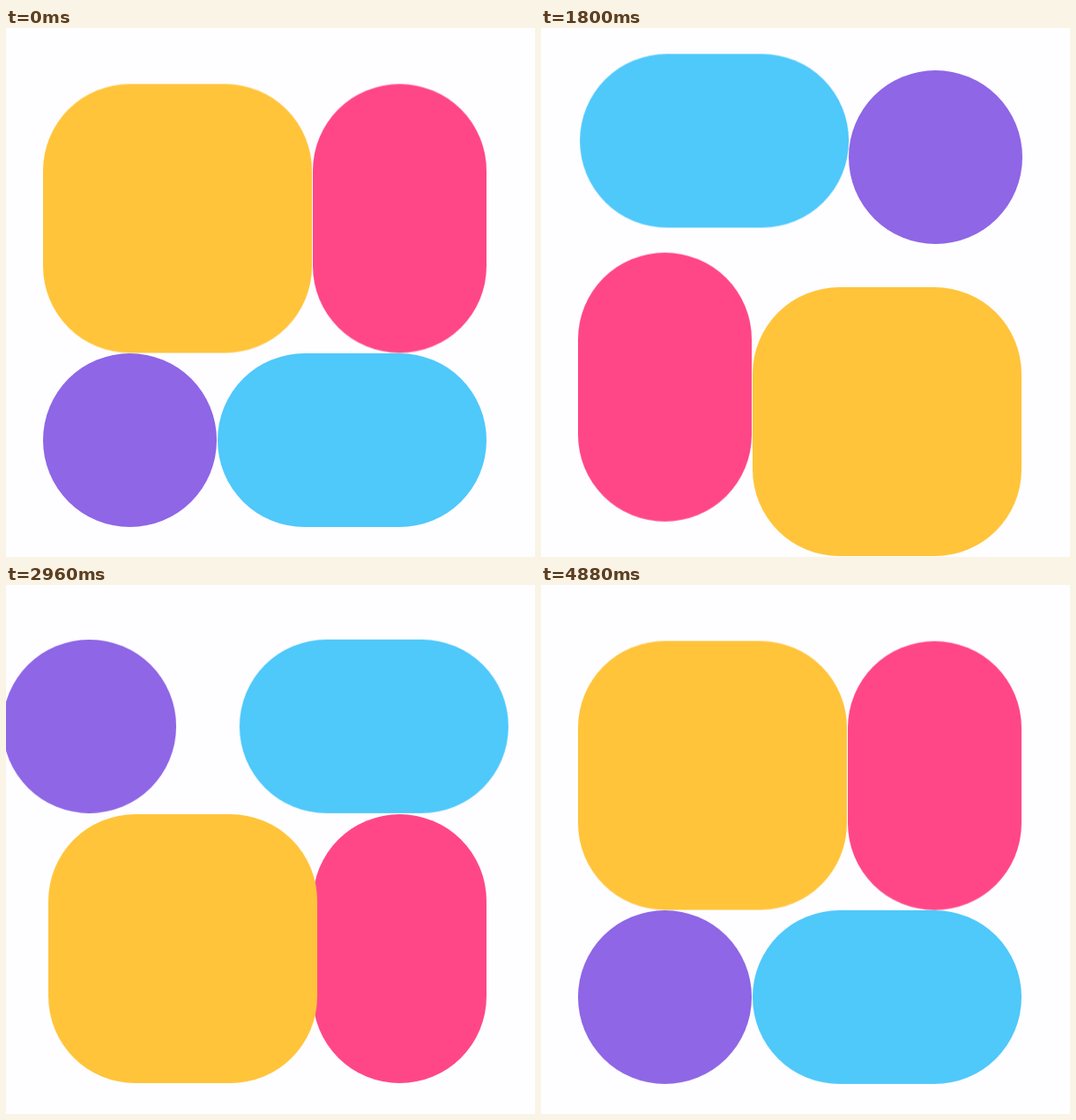
An HTML page for the animation above (4.92 s loop, 600 px wide and 600 px high).

```html
<!DOCTYPE html>
<html lang="en">
<head>
<meta charset="utf-8">
<title>Bouncing blocks</title>
<style>
  html, body { margin: 0; width: 100%; height: 100%; overflow: hidden; background: #fefdff; }
  .stage { position: relative; width: 600px; height: 600px; overflow: hidden; }
  .block { position: absolute; left: 0; top: 0; width: 197px; height: 197px; border-radius: 98.5px; will-change: transform; }
  .wide { width: 305px; }
  .tall { height: 305px; }
  #pink { background: #ff4788; }
  #blue { background: #4fc8fa; }
  #purple { background: #8e66e6; }
  #yellow { background: #ffc43a; }
</style>
</head>
<body>
<div class="stage">
  <div class="block tall" id="pink"></div>
  <div class="block wide" id="blue"></div>
  <div class="block" id="purple"></div>
  <div class="block wide tall" id="yellow"></div>
</div>
<script>
const LOOP = 4920;
const FREQ = 15.7;   // rad/s
const DECAY = 8.68;  // 1/s

// stops: resting corners; starts: when each move to the next stop begins (ms)
const blocks = [
  { id: 'yellow', stops: [[42, 63.5], [240, 63.5], [240, 260], [42, 260]], starts: [265, 1590, 2570, 3910] },
  { id: 'pink', stops: [[348, 63.5], [42, 63.5], [42, 260], [348.5, 260]], starts: [340, 1428, 2627, 4060] },
  { id: 'blue', stops: [[240, 369], [43, 368], [44, 63.5], [240.5, 62]], starts: [415, 1543, 2710, 4135] },
  { id: 'purple', stops: [[42, 369], [349, 368], [349, 63.5], [44, 62]], starts: [490, 1659, 2785, 3985] }
];
for (const b of blocks) b.style = document.getElementById(b.id).style;

// Underdamped step response from 0 to 1
function spring(ms) {
  if (ms <= 0) return 0;
  const s = ms / 1000, a = FREQ * s;
  return 1 - Math.exp(-DECAY * s) * (Math.cos(a) + DECAY / FREQ * Math.sin(a));
}

function place({ stops, starts, style }, t) {
  let [x, y] = stops[0];
  starts.forEach((start, i) => {
    const from = stops[i], to = stops[(i + 1) % stops.length];
    const k = spring(t - start);
    x += (to[0] - from[0]) * k;
    y += (to[1] - from[1]) * k;
  });
  style.transform = `translate(${x.toFixed(2)}px, ${y.toFixed(2)}px)`;
}

const origin = performance.now();
function draw() {
  const t = (performance.now() - origin) % LOOP;
  for (const b of blocks) place(b, t);
  requestAnimationFrame(draw);
}
draw();
</script>
</body>
</html>
```
